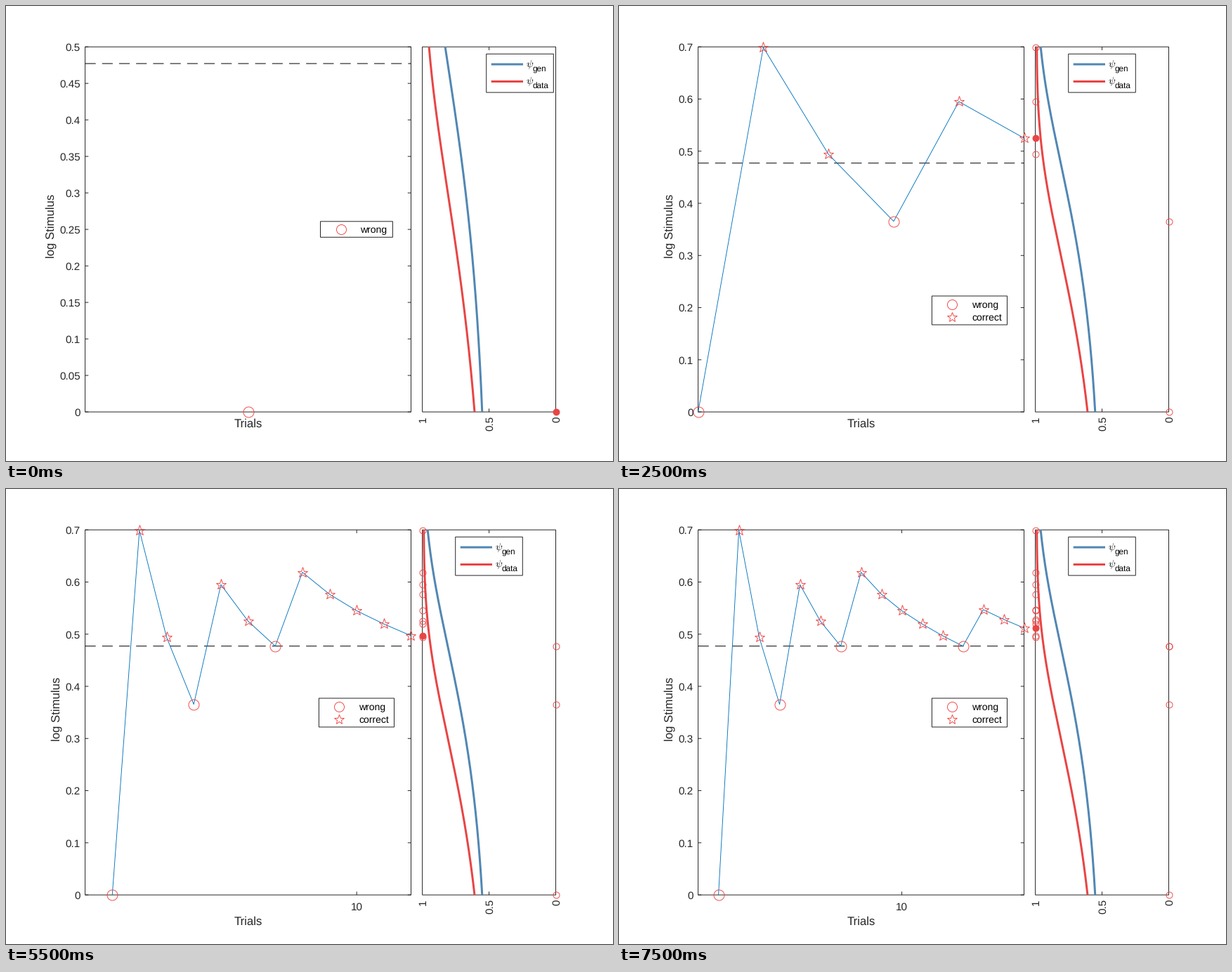
A matplotlib script that plays this animation: 864x648 px, repeating every 8000 ms.

```python
import numpy as np
import matplotlib.pyplot as plt
from matplotlib.animation import FuncAnimation
from matplotlib.patches import Rectangle

W, H, DPI = 864, 648, 100
PX = 72 / DPI  # points per pixel

plt.rcParams.update({"font.family": "Liberation Sans", "text.hinting": "none",
                     "path.snap": False})

INK, BLUE, RED = "#262626", "#5187b3", "#e84545"
TRACE, MARK = "#0072bd", "#f04040"

LEFT, RIGHT, TOP, BOTTOM = 112.6, 576.5, 58.2, 578.1
P_ONE, P_ZERO = 592.6, 782.5

THRESHOLD = np.log10(3)
LEVELS = [0, 0.699, 0.494, 0.3655, 0.595, 0.525, THRESHOLD, 0.6186, 0.5765,
          0.5448, 0.5195, 0.497, THRESHOLD, 0.547, 0.5284, 0.5118]
WRONG = {0, 3, 6, 12}

fig = plt.figure(figsize=(W / DPI, H / DPI), dpi=DPI, facecolor="white")
ax = fig.add_axes([0, 0, 1, 1])


def line(x, y, color=INK, width=1.0, **kw):
    ax.plot(x, y, color=color, lw=width * PX, solid_capstyle="butt", **kw)


def box(x0, y0, x1, y1, z=2):
    ax.add_patch(Rectangle((x0, y0), x1 - x0, y1 - y0, fc="white", ec=INK,
                           lw=PX, joinstyle="miter", zorder=z))


def label(x, y, s, size, color=INK, ha="left", **kw):
    ax.text(x, y, s, size=size * PX, color=color, ha=ha, va="baseline",
            rotation_mode="anchor", zorder=6, **kw)


def marker(x, y, shape, size, filled=False, z=5):
    ax.plot([x], [y], shape, ms=size * PX, mec=MARK, mew=0.9 * PX,
            mfc=RED if filled else "none", zorder=z)


def trial_marker(x, y, wrong, size=15):
    marker(x, y, "o" if wrong else "*", size if wrong else size + 0.6)


def weibull(s, scale):
    """Guess rate 0.5, lapse rate 0.01, slope 2 on a log10 axis."""
    return 0.5 + 0.49 * (1 - np.exp(-(10 ** s / scale) ** 2))


def prob_x(p):
    return P_ZERO + (P_ONE - P_ZERO) * p


def trial_limits(n):
    if n == 1:
        return 0, 2
    if n <= 10:
        return 1, n
    return 0, n + n % 2 if n < 15 else n


def trials_panel(n, top, step, to_y):
    lo, hi = trial_limits(n)

    def to_x(t):
        return LEFT + (RIGHT - LEFT) * (t - lo) / (hi - lo)

    box(LEFT, TOP, RIGHT, BOTTOM, z=1)
    for k in range(round(top / step) + 1):
        y = to_y(k * step)
        line([LEFT, LEFT + 4.7], [y, y])
        line([RIGHT - 4.7, RIGHT], [y, y])
        label(106, y + 5.7, f"{k * step:g}", 15.3, ha="right")
    if n >= 10:
        x = to_x(10)
        line([x, x], [BOTTOM - 4.7, BOTTOM])
        line([x, x], [TOP, TOP + 4.7])
        label(x, 600, "10", 15.3, ha="center")

    label(344.5, 621.3 if n >= 10 else 600.3, "Trials", 16.8, ha="center")
    label(68.3 if n == 1 else 76.8, 313, "log Stimulus", 16.8, ha="center",
          rotation=90)

    y = to_y(THRESHOLD)
    line([LEFT, RIGHT], [y, y], "black", dashes=(15.1, 9.1),
         dash_capstyle="butt")

    xs = [to_x(t) for t in range(1, n + 1)]
    ys = [to_y(v) for v in LEVELS[:n]]
    line(xs, ys, TRACE, 0.9, zorder=3)
    for i, (x, y) in enumerate(zip(xs, ys)):
        trial_marker(x, y, i in WRONG)

    if n == 1:
        box(447.5, 306.8, 550.4, 329.3, z=4)
        trial_marker(477, 318.2, True, 14)
        label(504.5, 323.2, "wrong", 14, "black")
        return
    y = 413 if lo == 1 else 298
    box(445.4, y, 552.5, y + 41, z=4)
    for dy, name in ((12, "wrong"), (29.5, "correct")):
        trial_marker(474, y + dy, name == "wrong", 14)
        label(502, y + dy + 4.9, name, 14, "black")


def curve_panel(n, top, to_y):
    box(P_ONE, TOP, P_ZERO, BOTTOM, z=1)
    mid = prob_x(0.5)
    line([mid, mid], [BOTTOM - 4.7, BOTTOM])
    line([mid, mid], [TOP, TOP + 4.7])
    for p in (1, 0.5, 0):
        label(prob_x(p) + 5.6, 584.1, f"{p:g}", 15.3, ha="right", rotation=90)

    s = np.linspace(0, top, 200)
    line(prob_x(weibull(s, 3)), to_y(s), BLUE, 3, zorder=3)
    line(prob_x(weibull(s, 2)), to_y(s), RED, 3, zorder=3)

    for i, v in enumerate(LEVELS[:n]):
        marker(prob_x(i not in WRONG), to_y(v), "o", 9, filled=i == n - 1)

    x = 683.7 if n == 1 else 639.7
    box(x, 68.3, x + 95.6, 123.1, z=4)
    for y, color, name in ((83, BLUE, "gen"), (107.5, RED, "data")):
        line([x + 7, x + 52.3], [y, y], color, 3, zorder=5)
        label(x + 56.5, y + 3.6, r"$\psi$", 14.5, "black",
              math_fontfamily="cm")
        label(x + 66.2, y + 9.2, name, 11.8, "black")


def draw(frame):
    n = frame + 1
    top, step = (0.5, 0.05) if n == 1 else (0.7, 0.1)

    def to_y(v):
        return BOTTOM + (TOP - BOTTOM) * v / top

    ax.clear()
    ax.axis("off")
    trials_panel(n, top, step, to_y)
    curve_panel(n, top, to_y)
    ax.set(xlim=(0, W), ylim=(H, 0))
    return []


anim = FuncAnimation(fig, draw, frames=len(LEVELS), interval=500,
                     init_func=lambda: draw(0), repeat=True, repeat_delay=0)
plt.show()
```
